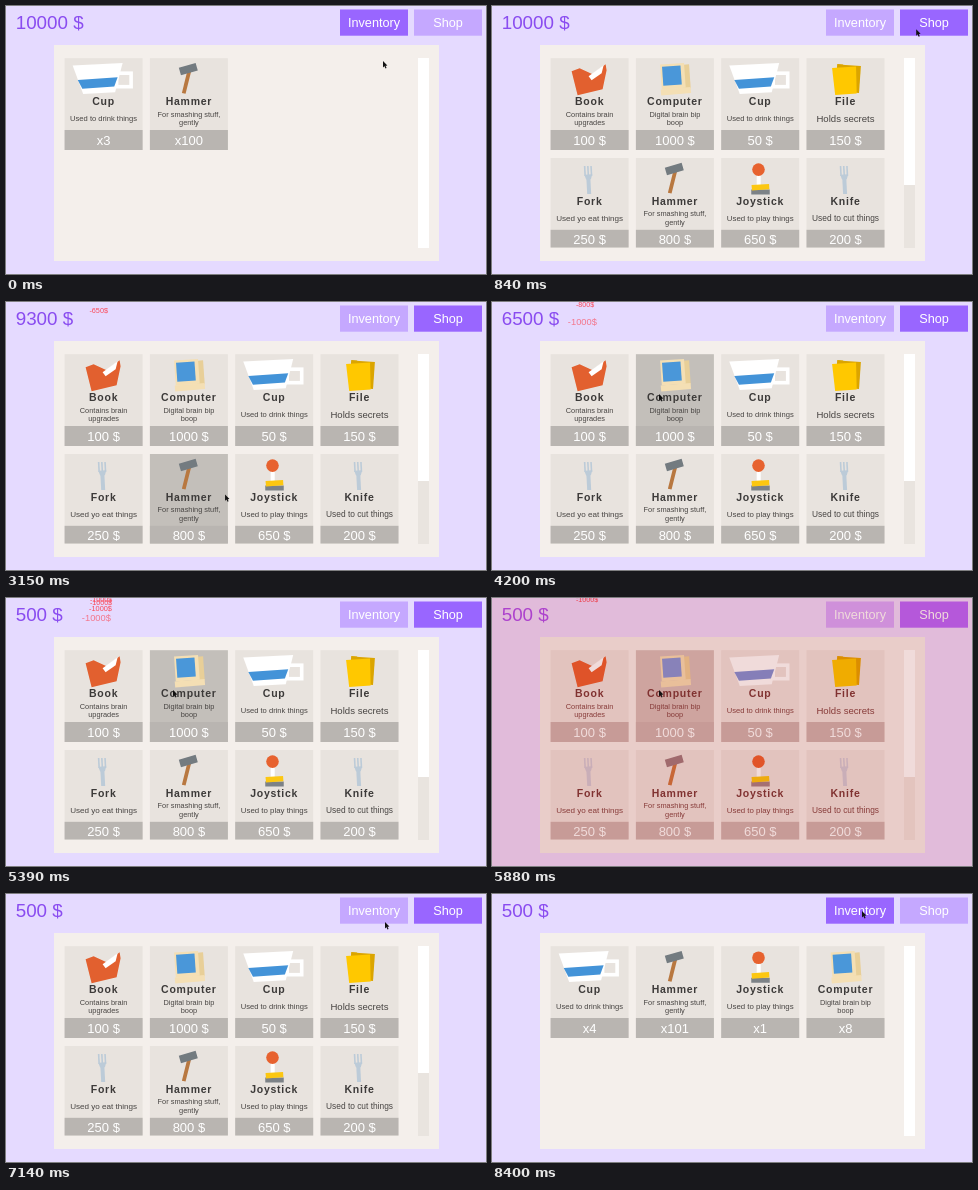
Write an HTML page with a canvas that moves like this. It is 480 px wide and 268 px high and loops after 8470 ms.

```html
<!DOCTYPE html>
<html lang="en">
<head>
<meta charset="utf-8">
<title>Item shop</title>
<style>
html, body { margin: 0; width: 100%; height: 100%; overflow: hidden; background: #e5daff; }
canvas { display: block; width: 480px; height: 268px; }
</style>
</head>
<body>
<canvas id="stage"></canvas>
<script>
const W = 480, H = 268, LOOP = 8470;
const canvas = document.getElementById('stage');
const ctx = canvas.getContext('2d');
const dpr = window.devicePixelRatio || 1;
canvas.width = W * dpr;
canvas.height = H * dpr;

const FONT = '"Liberation Sans", Arial, sans-serif';
const SHOP_AT = 630, INVENTORY_AT = 7420;
const POPUP_DELAY = 160, POPUP_LIFE = 720;
const CARD = { x: 58.6, y: 52.2, w: 78, h: 91.8, stepX: 85.3, stepY: 99.8 };

const clamp = v => Math.max(0, Math.min(1, v));
const ease = u => u * u * (3 - 2 * u);

function rect(color, x, y, w, h) {
  ctx.fillStyle = color;
  ctx.fillRect(x, y, w, h);
}

// Centred box, tilted by degrees; taper narrows its lower edge.
function box(color, cx, cy, w, h, deg = 0, taper = 1) {
  ctx.save();
  ctx.translate(cx, cy);
  ctx.rotate(deg * Math.PI / 180);
  ctx.fillStyle = color;
  ctx.beginPath();
  ctx.moveTo(-w / 2, -h / 2);
  ctx.lineTo(w / 2, -h / 2);
  ctx.lineTo(w / 2 * taper, h / 2);
  ctx.lineTo(-w / 2 * taper, h / 2);
  ctx.fill();
  ctx.restore();
}

function disc(color, x, y, r) {
  ctx.fillStyle = color;
  ctx.beginPath();
  ctx.arc(x, y, r, 0, Math.PI * 2);
  ctx.fill();
}

function poly(color, ...points) {
  ctx.fillStyle = color;
  ctx.beginPath();
  for (const [x, y] of points) ctx.lineTo(x, y);
  ctx.fill();
}

function text(str, x, y, size, color, { align = 'center', bold = false, spacing = 0 } = {}) {
  ctx.font = `${bold ? 'bold ' : ''}${size}px ${FONT}`;
  ctx.letterSpacing = spacing + 'px';
  ctx.textAlign = align;
  ctx.fillStyle = color;
  ctx.fillText(str, x, y);
}

function drawFork() {
  const color = '#bccbd8';
  for (let i = -1; i <= 1; i++) box(color, 37.5 + i * 3.2, 13, 1.6, 10, -3);
  box(color, 37.8, 19, 8, 5, -3, 0.6);
  box(color, 38.2, 28.5, 4, 15, -3);
}

// Icons use the card's top left corner as origin.
const icons = {
  Book() {
    poly('#e2602f', [21, 13], [29, 10], [42, 16], [55, 6], [56, 12], [52, 31], [27, 37]);
    poly('#fff', [38, 18], [53, 7], [51, 15], [41, 22]);
  },
  Computer() {
    box('#e8cf98', 48, 18.5, 12, 24, -4);
    box('#f4dfb4', 40, 33, 30, 6, -5);
    box('#f4dfb4', 37, 18, 24, 25, -4);
    box('#4a97d9', 36, 17.5, 18.5, 19, -4);
  },
  Cup() {
    ctx.strokeStyle = '#fff';
    ctx.lineWidth = 3.6;
    ctx.strokeRect(52, 15, 14.5, 13.5);
    box('#fff', 33.8, 20.5, 50, 29, -3, 0.64);
    box('#4393d8', 33.4, 25, 40, 9, -4, 0.8);
  },
  File() {
    box('#dba500', 42, 20.5, 23, 27, 4);
    box('#dba500', 33.5, 9, 6, 6, 4);
    box('#ffc800', 38.5, 22.5, 24, 27, -4, 0.9);
  },
  Fork: drawFork,
  Hammer() {
    box('#b87840', 36.6, 24, 3.8, 23, 14);
    box('#737b80', 38.4, 11, 17.5, 7.8, -16);
  },
  Joystick() {
    box('#fff', 37.5, 21, 4, 14);
    disc('#e7622f', 37.3, 11.6, 6.3);
    box('#7c8287', 39.3, 34, 18.5, 5);
    box('#fcc711', 39.3, 29.2, 17.5, 5.4, -4);
  },
  Knife: drawFork
};

const item = (name, price, ...desc) => ({ name, price, desc, icon: icons[name] });

const shop = [
  item('Book', 100, 'Contains brain', 'upgrades'),
  item('Computer', 1000, 'Digital brain bip', 'boop'),
  item('Cup', 50, 'Used to drink things'),
  item('File', 150, 'Holds secrets'),
  item('Fork', 250, 'Used yo eat things'),
  item('Hammer', 800, 'For smashing stuff,', 'gently'),
  item('Joystick', 650, 'Used to play things'),
  item('Knife', 200, 'Used to cut things')
];
const byName = Object.fromEntries(shop.map(i => [i.name, i]));

const buy = (name, t) => ({ name, t });
const purchases = [buy('Cup', 1960), buy('Joystick', 2750), buy('Hammer', 3560)];
for (let i = 0; i < 8; i++) purchases.push(buy('Computer', 4010 + i * 170));

// Each move glides the pointer to a spot between two times.
const move = (start, end, x, y) => ({ start, end, x, y });
const moves = [
  move(70, 420, 443, 17),
  move(690, 1470, 251, 82),
  move(2030, 2600, 267, 193),
  move(2850, 3400, 183, 192),
  move(3630, 3940, 167, 92),
  move(6560, 7140, 379, 28),
  move(7140, 7350, 370, 17)
];

function pointerAt(t) {
  let x = 377, y = 55;
  for (const m of moves) {
    const k = ease(clamp((t - m.start) / (m.end - m.start)));
    x += (m.x - x) * k;
    y += (m.y - y) * k;
  }
  return { x, y };
}

// Largest size at which a single line fits the card.
function descSize(desc) {
  if (desc.length > 1) return 7.4;
  ctx.font = `10px ${FONT}`;
  ctx.letterSpacing = '0px';
  return Math.min(9.6, 670 / ctx.measureText(desc[0]).width);
}

function drawCard(it, index, label, pointer) {
  const x = CARD.x + (index % 4) * CARD.stepX;
  const y = CARD.y + Math.floor(index / 4) * CARD.stepY;
  const dx = pointer.x - x, dy = pointer.y - y;
  const hover = dx >= 0 && dx < CARD.w && dy >= 0 && dy < CARD.h;
  const mid = CARD.w / 2;
  ctx.save();
  ctx.translate(x, y);
  rect(hover ? '#c3bfba' : '#e8e3de', 0, 0, CARD.w, CARD.h);
  rect('#b9b5b1', 0, 71.8, CARD.w, 20);
  it.icon();
  text(it.name, mid, 46.8, 10.5, '#3c3a39', { bold: true, spacing: 0.75 });
  const size = descSize(it.desc);
  const top = it.desc.length > 1 ? 58.4 : 60.4 + size * 0.35;
  it.desc.forEach((d, i) => text(d, mid, top + i * 8.6, size, '#484543'));
  text(label, mid, 86.3, 13, '#fff');
  ctx.restore();
}

function inventory(bought) {
  const count = { Cup: 3, Hammer: 100 };
  for (const p of bought) count[p.name] = (count[p.name] || 0) + 1;
  return Object.entries(count);
}

function drawPanel(shopOpen, bought, pointer) {
  rect('#f4efeb', 48, 39, 385, 216);
  rect('#e9e4df', 412, 52, 11, 190);
  rect('#fff', 412, 52, 11, shopOpen ? 127 : 190);
  ctx.save();
  ctx.beginPath();
  ctx.rect(48, 52, 364, 189.5);
  ctx.clip();
  if (shopOpen) shop.forEach((it, i) => drawCard(it, i, it.price + ' $', pointer));
  else inventory(bought).forEach(([name, n], i) => drawCard(byName[name], i, 'x' + n, pointer));
  ctx.restore();
}

function drawButton(label, x, active) {
  rect(active ? '#9966ff' : '#c5a8ff', x, 3.5, 68, 26.2);
  text(label, x + 34, 21.3, 12.7, '#fff');
}

// Prices shrink and drift off the top edge.
function drawPopup(p, t) {
  const age = t - p.t - POPUP_DELAY;
  if (age < 0 || age > POPUP_LIFE) return;
  const k = Math.exp(-age / 80);
  const size = 7.1 + 3.3 * k;
  const y = -3 + 25 * Math.exp(-age / 320);
  ctx.globalAlpha = clamp(Math.min(age / 45, (POPUP_LIFE - age) / 150));
  text(`-${byName[p.name].price}$`, 84 - 12 * k, y + size * 0.35, size, '#fb4a59', { align: 'left' });
  ctx.globalAlpha = 1;
}

function blend(mode, color, alpha) {
  ctx.globalCompositeOperation = mode;
  ctx.globalAlpha = alpha;
  rect(color, 0, 0, W, H);
  ctx.globalCompositeOperation = 'source-over';
  ctx.globalAlpha = 1;
}

// Red tint when the money runs out
function drawFlash(t) {
  const strength = clamp(Math.min((t - 5450) / 100, (6850 - t) / 370));
  if (!strength) return;
  blend('screen', 'rgb(100, 0, 0)', strength);
  blend('multiply', 'rgb(240, 219, 218)', strength);
}

function drawPointer({ x, y }) {
  poly('#111', [x, y], [x, y + 6.4], [x + 1.6, y + 5], [x + 4.4, y + 4.5]);
  box('#111', x + 2.4, y + 5.8, 1.2, 3, -25);
}

function draw(t) {
  const pointer = pointerAt(t);
  const shopOpen = t >= SHOP_AT && t < INVENTORY_AT;
  const bought = purchases.filter(p => p.t <= t);
  const money = bought.reduce((sum, p) => sum - byName[p.name].price, 10000);

  ctx.setTransform(dpr, 0, 0, dpr, 0, 0);
  rect('#e5daff', 0, 0, W, H);
  text(money + ' $', 9.7, 23.2, 18.8, '#8a4cf0', { align: 'left' });
  drawButton('Inventory', 334, !shopOpen);
  drawButton('Shop', 408, shopOpen);
  drawPanel(shopOpen, bought, pointer);
  bought.forEach(p => drawPopup(p, t));
  drawFlash(t);
  drawPointer(pointer);
}

const start = performance.now();
function tick() {
  draw((performance.now() - start) % LOOP);
  requestAnimationFrame(tick);
}
tick();
</script>
</body>
</html>
```
